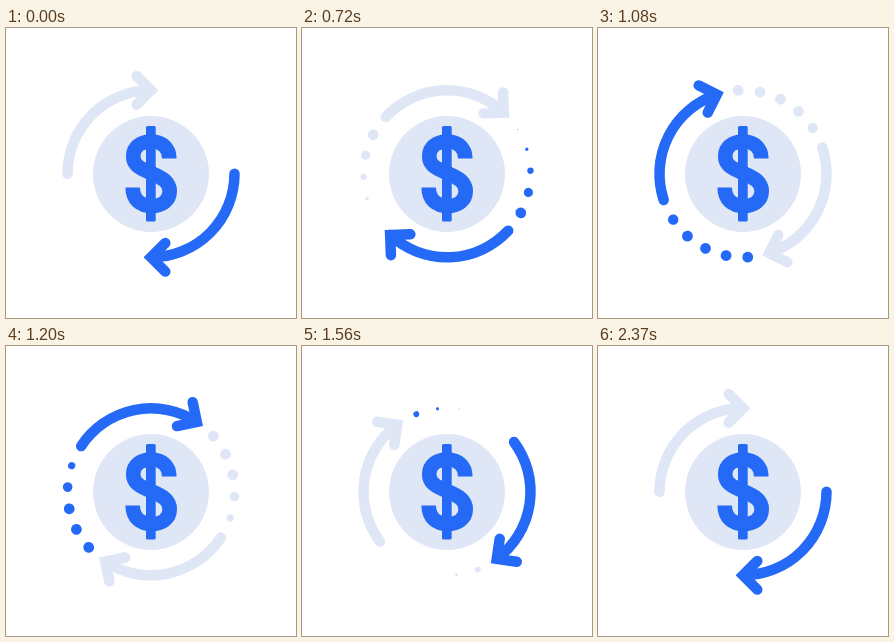
These frames come from a looping animation (290x290 px, 2.4 s). An HTML page:

```html
<!DOCTYPE html>
<html lang="en">
<head>
<meta charset="utf-8">
<title>Money cycle</title>
<style>
  html, body { margin: 0; width: 100%; height: 100%; overflow: hidden; background: #fff; }
  svg { display: block; width: 100%; height: 100%; }
  .line { fill: none; stroke-width: 10.5; stroke-linecap: round; }
</style>
</head>
<body>
<svg viewBox="0 0 290 290">
  <circle cx="145" cy="146" r="58" fill="#dfe6f5"/>
  <path fill="none" stroke="#256af6" stroke-width="14.6" d="M163.3 130.5C163.3 120 156 113.5 145.5 113.5C134 113.5 127.2 119.5 127.2 128.2C127.2 138.5 137 141.5 146 145.5C156.5 150 163.7 154 163.7 163.3C163.7 172.5 156 178 146 178C134 178 126.7 171.5 126.7 159.5"/>
  <rect x="140" y="98" width="9.7" height="95.5" rx="1.5" fill="#256af6"/>
  <g id="ring" transform="translate(145 145.8)"></g>
</svg>
<script>
const LOOP = 2400, RADIUS = 83.5, DOTS = 5, DOT_RADIUS = 5.4, HEAD = 14.3;
const SPIN = { start: 238, length: 1780, x1: 0.53, x2: 0.463 };
const GROW = [330, 740], SHRINK = [1030, 1480], STAGGER = 80;
const ring = document.getElementById('ring');

function add(parent, tag, attrs) {
  const el = document.createElementNS('http://www.w3.org/2000/svg', tag);
  for (const name in attrs) el.setAttribute(name, attrs[name]);
  return parent.appendChild(el);
}

// A quarter-turn arrow with its tail at angle 0, followed by trailing dots.
function makeArrow(color, offset) {
  const group = add(ring, 'g', { fill: color, stroke: color });
  add(group, 'path', {
    class: 'line',
    d: `M${RADIUS} 0A${RADIUS} ${RADIUS} 0 0 1 0 ${RADIUS}m${HEAD} ${-HEAD}l${-HEAD} ${HEAD}l${HEAD} ${HEAD}`
  });
  const dots = Array.from({ length: DOTS }, (_, i) =>
    add(group, 'circle', { cx: RADIUS, r: 0, stroke: 'none', transform: `rotate(${-15 * (i + 1)})` }));
  return { group, dots, offset };
}

const arrows = [makeArrow('#dfe6f5', 180), makeArrow('#256af6', 0)];

const clamp = x => Math.min(1, Math.max(0, x));
const smooth = x => x * x * (3 - 2 * x);
const ramp = (t, [from, to]) => smooth(clamp((t - from) / (to - from)));

// Cubic bezier (x1, 0, x2, 1), solved by bisection.
function ease(x, x1, x2) {
  let low = 0, high = 1;
  for (let i = 0; i < 24; i++) {
    const s = (low + high) / 2, r = 1 - s;
    if (3 * r * r * s * x1 + 3 * r * s * s * x2 + s * s * s < x) low = s;
    else high = s;
  }
  return smooth((low + high) / 2);
}

function draw(now) {
  const t = now % LOOP;
  const angle = 360 * ease(clamp((t - SPIN.start) / SPIN.length), SPIN.x1, SPIN.x2);
  for (const { group, dots, offset } of arrows) {
    group.setAttribute('transform', `rotate(${angle + offset})`);
    dots.forEach((dot, i) => {
      const local = t - i * STAGGER;
      dot.setAttribute('r', DOT_RADIUS * (ramp(local, GROW) - ramp(local, SHRINK)));
    });
  }
}

const begin = performance.now();
function tick() {
  draw(performance.now() - begin);
  requestAnimationFrame(tick);
}
tick();
</script>
</body>
</html>
```
